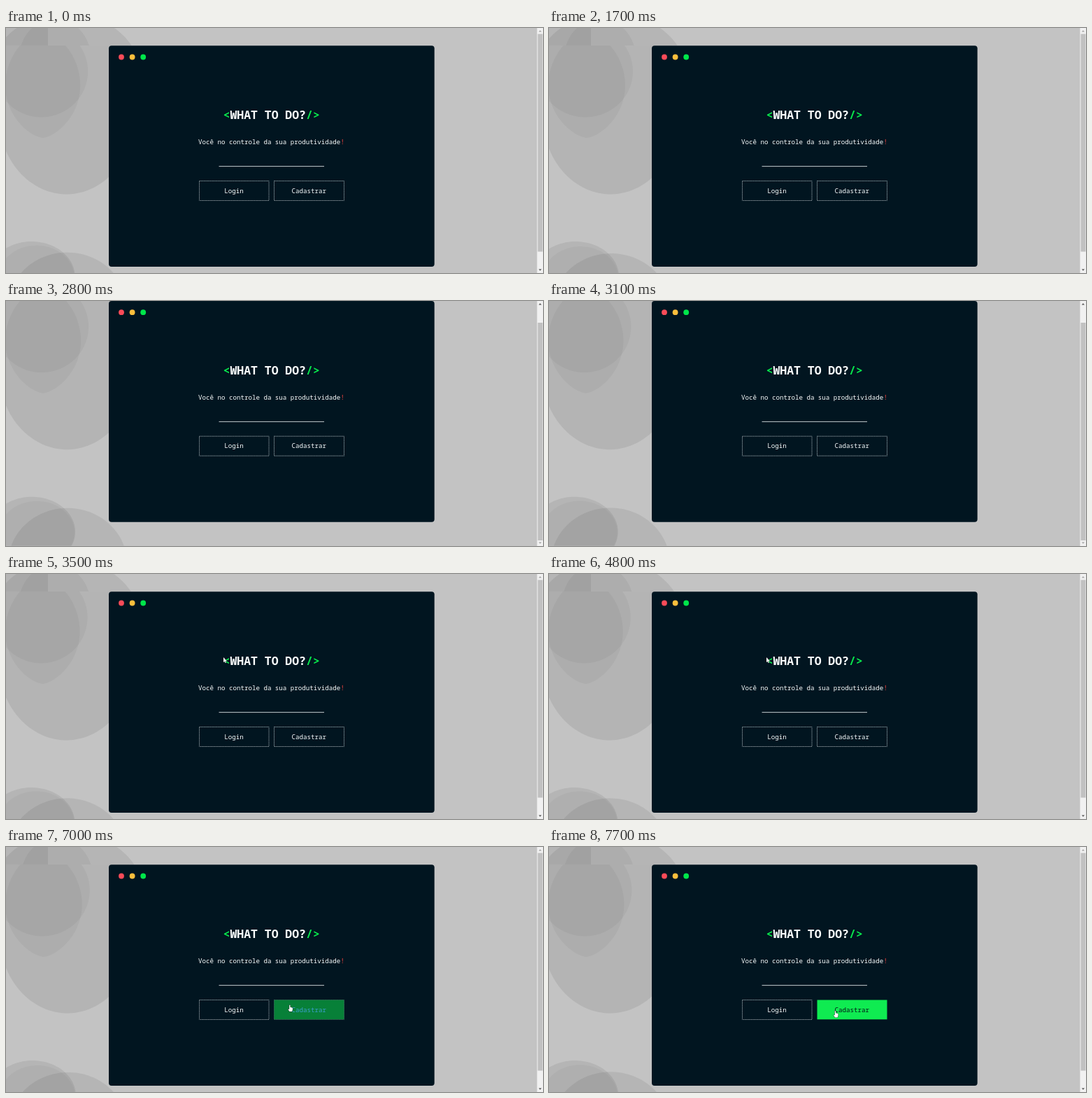
An HTML page with a canvas for the animation above (8 s loop, 768x350 px).

```html
<!DOCTYPE html>
<html lang="pt-BR">
<head>
<meta charset="utf-8">
<title>What to do?</title>
<style>
html, body { margin: 0; width: 100%; height: 100%; overflow: hidden; background: #c3c3c3; }
canvas { display: block; width: 768px; height: 350px; }
</style>
</head>
<body>
<canvas id="stage" width="768" height="350"></canvas>
<script>
const ctx = document.getElementById('stage').getContext('2d');
const LOOP = 8000, SWAY = 5000, SEAM = 25, SCROLL = 25.3;
const MONO = '"Noto Sans Mono", "DejaVu Sans Mono", monospace';
const ADVANCE = 0.6;
const GREEN = '#08e94c', NAVY = '#011520', WHITE = '#fbfdfd';

const clamp = v => Math.max(0, Math.min(1, v));
const lerp = (a, b, p) => a + (b - a) * p;
const ease = p => p * p * (3 - 2 * p);
const span = (t, a, b) => ease(clamp((t - a) / (b - a)));

const shade = alpha => `rgba(0,0,0,${alpha})`;

// Egg with separate upper and lower radii; point > 1 sharpens both tips
function egg({ x, y, rx, up, down = up, point = 1, alpha }) {
  ctx.beginPath();
  for (let a = 0; a < 2 * Math.PI; a += 0.05) {
    const c = Math.cos(a), s = Math.sin(a);
    ctx.lineTo(x + rx * Math.sign(c) * Math.abs(c) ** point, y + s * (s < 0 ? up : down));
  }
  ctx.fillStyle = shade(alpha);
  ctx.fill();
}

function clipped(y, h, paint) {
  ctx.save();
  ctx.beginPath();
  ctx.rect(0, y, 768, h);
  ctx.clip();
  paint();
  ctx.restore();
}

function backdrop(t) {
  const k = Math.cos((t - 1600) / SWAY * 2 * Math.PI);
  // Tail of the repeated background, above the seam
  clipped(0, SEAM, () => {
    egg({ x: 86 + 2 * k, y: 65, rx: 107 + k, up: 86, alpha: 0.075 });
    ctx.fillRect(0, 0, 60, SEAM);
    egg({ x: 71 + 2 * k, y: 42, rx: 51, up: 55, alpha: 0.045 });
  });
  clipped(SEAM, 350, () => {
    egg({ x: 87 + k, y: 125, rx: 97, up: 240, down: 112.5, alpha: 0.08 });
    egg({ x: 51 + k, y: 62, rx: 67 + k, up: 65.5, alpha: 0.04 });
    egg({ x: 53 + k, y: 82, rx: 54 + k, up: 78, down: 75, point: 1.3, alpha: 0.04 });
    egg({ x: 37 + k, y: 355, rx: 62, up: 50, alpha: 0.075 });
    egg({ x: 44 + k, y: 356 + k, rx: 54, up: 45, alpha: 0.03 });
    egg({ x: 88 + k, y: 400 + k, rx: 85, up: 79, alpha: 0.07 });
  });
}

function text(str, x, y, size, color, weight = 500) {
  ctx.font = `${weight} ${size}px ${MONO}`;
  ctx.fillStyle = color;
  ctx.fillText(str, x, y);
  return x + str.length * size * ADVANCE;
}

function dashedBox(x, y, w, h) {
  ctx.strokeStyle = '#a3abb0';
  ctx.lineWidth = 1;
  ctx.setLineDash([1.2, 1]);
  ctx.strokeRect(x + 0.5, y + 0.5, w - 1, h - 1);
  ctx.setLineDash([]);
}

function panel(hover) {
  ctx.fillStyle = NAVY;
  ctx.beginPath();
  ctx.roundRect(147, 25.3, 465.7, 315.7, 4);
  ctx.fill();

  ['#fa4b58', '#fcbe3c', '#00e64a'].forEach((color, i) => {
    ctx.fillStyle = color;
    ctx.beginPath();
    ctx.arc(165 + 15.6 * i, 41.5, 3.9, 0, 2 * Math.PI);
    ctx.fill();
  });

  const big = 16.45, small = 9.17;
  let x = text('<', 310.6, 130.4, big, GREEN, 700);
  x = text('WHAT TO DO?', x, 130.4, big, WHITE, 700);
  text('/>', x, 130.4, big, GREEN, 700);

  x = text('Você no controle da sua produtividade', 275, 166.4, small, WHITE);
  text('!', x, 166.4, small, '#e8413c');

  ctx.fillStyle = '#d9dddf';
  ctx.fillRect(304.5, 197.2, 150.5, 0.9);

  dashedBox(276, 218, 100.5, 29);
  text('Login', 312.2, 235.6, small, WHITE);

  ctx.globalAlpha = 1 - hover;
  dashedBox(383, 218, 101, 29);
  ctx.globalAlpha = hover;
  ctx.fillStyle = '#0feb51';
  ctx.fillRect(383.5, 218.5, 100, 27.8);
  ctx.globalAlpha = 1;
  text('Cadastrar', 408.6, 235.6, small, `hsl(200 60% ${lerp(99, 6, hover)}%)`);
}

function triangle(y, dir, active) {
  ctx.fillStyle = active ? '#505050' : '#a3a3a3';
  ctx.beginPath();
  ctx.moveTo(761.8, y - dir);
  ctx.lineTo(766, y - dir);
  ctx.lineTo(763.9, y + 1.3 * dir);
  ctx.fill();
}

function scrollbar(down) {
  ctx.fillStyle = '#f1f1f1';
  ctx.fillRect(759.5, 0, 8.5, 350);
  ctx.fillStyle = '#c1c1c1';
  ctx.fillRect(760.5, down ? 31 : 8.5, 7, 311);
  triangle(4.5, -1, down);
  triangle(345.5, 1, !down);
}

function outlined(path) {
  ctx.lineWidth = 0.7;
  ctx.strokeStyle = '#101418';
  ctx.stroke(path);
  ctx.fillStyle = '#fff';
  ctx.fill(path);
}

const ARROW = new Path2D('M0 0V7.2L1.6 5.8 2.7 8.3 3.8 7.8 2.7 5.4H5Z');
const HAND = new Path2D('M-.7 0H.6V3L4 3.8V7L3 9.2H-.4L-2.7 5.8-.7 6Z');

function pointer(t) {
  if (t < 3500) return;
  const a = span(t, 5850, 6500), b = span(t, 6500, 7300);
  const x = lerp(lerp(311, 398, a), 409.5, b);
  const y = lerp(lerp(119, 207.5, a), 234.3, b);
  ctx.save();
  ctx.translate(x, y);
  outlined(y > 218 ? HAND : ARROW);
  ctx.restore();
}

function draw(t) {
  const down = t >= 2800 && t < 3500;
  ctx.fillStyle = '#c3c3c3';
  ctx.fillRect(0, 0, 768, 350);
  ctx.save();
  if (down) ctx.translate(0, -SCROLL);
  backdrop(t);
  panel(span(t, 6750, 7250));
  ctx.restore();
  scrollbar(down);
  pointer(t);
}

const start = performance.now();
function tick() {
  draw((performance.now() - start) % LOOP);
  requestAnimationFrame(tick);
}
tick();
</script>
</body>
</html>
```
